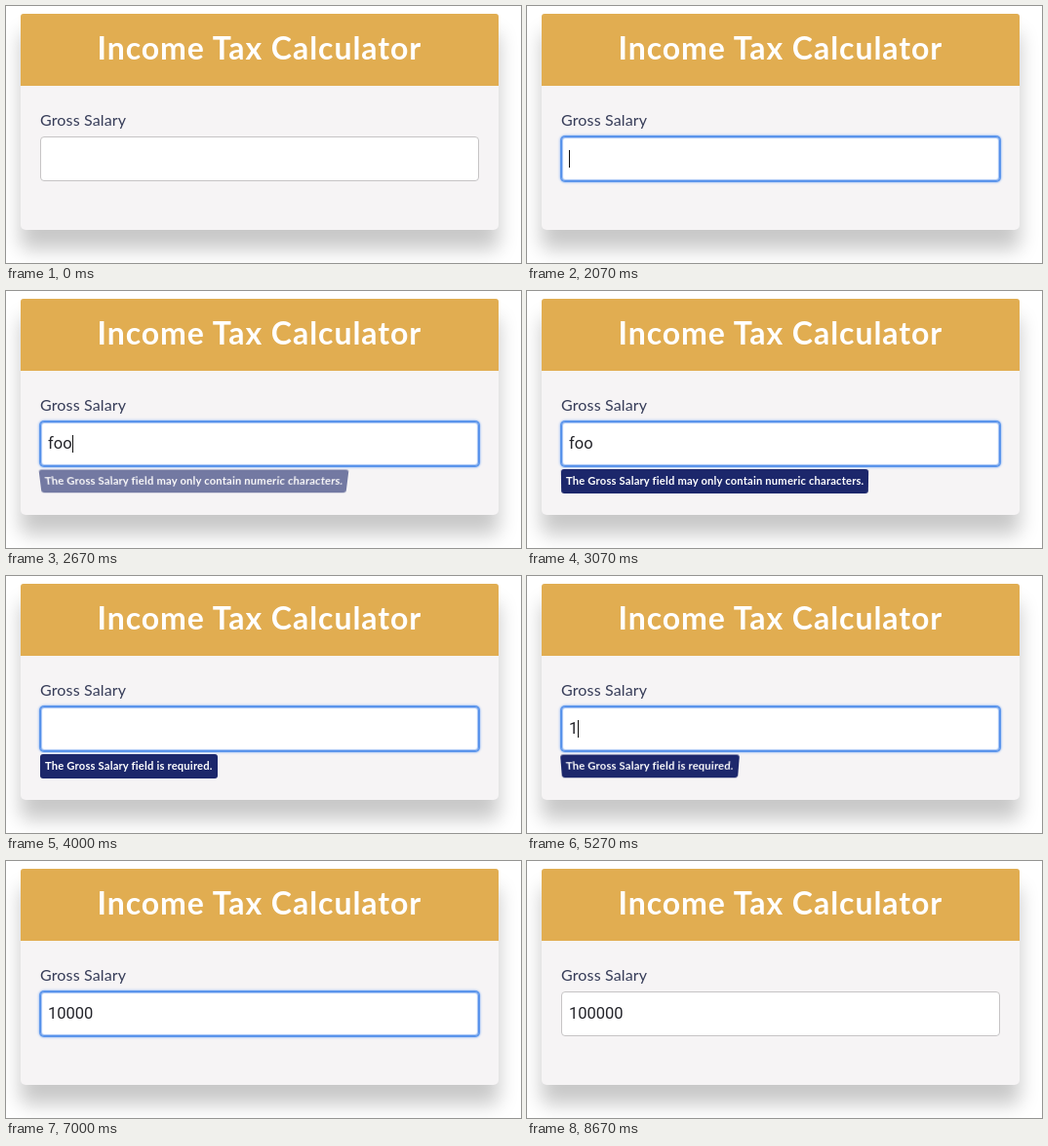
An HTML page that plays this animation: 528 px wide and 264 px high, repeating every 9940 ms.

```html
<!DOCTYPE html>
<html lang="en">
<head>
<meta charset="utf-8">
<title>Income Tax Calculator</title>
<style>
html, body { margin: 0; width: 100%; height: 100%; overflow: hidden; background: #fff; }
body { position: relative; font: 16px Lato, "Open Sans", sans-serif; white-space: pre; }
div { position: absolute; box-sizing: border-box; }
#card {
  left: 15px; top: 8px; width: 490px; height: 222px; border-radius: 4px 4px 5px 5px;
  background: #f6f4f5; box-shadow: 0 20px 20px rgba(0, 0, 0, .22);
}
#head {
  width: 490px; height: 74px; padding-left: 78.5px; border-radius: 3px 3px 0 0;
  background: #e1ad51; color: #fff; font-size: 32px; font-weight: 700;
  line-height: 70px; letter-spacing: .95px;
}
#label { left: 20px; top: 99px; line-height: 20px; letter-spacing: .15px; color: #363c58; }
#field {
  left: 20px; top: 126px; width: 450px; height: 46px; padding: 13px 7px;
  border: 1px solid #c6c4c5; border-radius: 4px; background: #fff;
  color: #25252b; font: 16.5px/18px Roboto, sans-serif;
}
#field.focus {
  border-color: #5590ea;
  box-shadow: 0 0 0 1px #5f98ec, 0 0 2px 1.5px #9dbff5, inset 0 0 1px 1px #a5c4f5;
}
#caret {
  display: inline-block; width: 1px; height: 18px; margin-right: -1px;
  vertical-align: top; background: #111;
}
#error {
  left: 20px; top: 175px; height: 25px; padding: 0 5px; border-radius: 3px;
  background: #1c276b; color: #fff; font-size: 11.2px; font-weight: 700;
  line-height: 24px; letter-spacing: .19px;
}
</style>
</head>
<body>
<div id="card"><div id="head">Income Tax Calculator</div><div id="label">Gross Salary</div><div id="field"><span id="value"></span><span id="caret"></span></div><div id="error"></div></div>
<script>
const LOOP = 9940;
const FOCUS = 1070, BLUR = 8670;
const FLIP_IN = 2250, REQUIRED = 3870, FLIP_OUT = 4990, GONE = 5930;

// [time, value]
const values = [
  [0, ''], [2270, 'f'], [2400, 'fo'], [2530, 'foo'],
  [3330, 'fo'], [3600, 'f'], [3800, ''],
  [5000, '1'], [5530, '10'], [5870, '100'], [6270, '1000'], [6530, '10000'], [7530, '100000']
];
// The caret toggles at each of these times
const blinks = [FOCUS, 1530, 2070, 3060, 3530, 4000, 4530, 7000, 7530, 8070, 8530, BLUR];

const [field, value, caret, error] =
  ['field', 'value', 'caret', 'error'].map(id => document.getElementById(id));

const tilt = deg => `perspective(400px) rotateX(${deg}deg)`;

function pausedFlip(frames, options) {
  const flip = error.animate(frames, options);
  flip.pause();
  return flip;
}

const flipIn = pausedFlip([
  { offset: 0, transform: tilt(90), opacity: 0, easing: 'ease-in' },
  { offset: .4, transform: tilt(-20), easing: 'ease-in' },
  { offset: .6, transform: tilt(10), opacity: 1, easing: 'ease' },
  { offset: .8, transform: tilt(-5), easing: 'ease' },
  { offset: 1, transform: tilt(0), opacity: 1 }
], { duration: 950, fill: 'both' });

const flipOut = pausedFlip([
  { offset: 0, transform: tilt(0), opacity: 1 },
  { offset: .3, transform: tilt(-20), opacity: 1 },
  { offset: 1, transform: tilt(90), opacity: 0 }
], { duration: 930, fill: 'forwards' });

function setText(el, text) {
  if (el.textContent !== text) el.textContent = text;
}

function draw(now) {
  const t = now % LOOP;
  field.classList.toggle('focus', t >= FOCUS && t < BLUR);
  setText(value, values.filter(([at]) => at <= t).pop()[1]);
  caret.style.visibility = blinks.filter(at => at <= t).length % 2 ? 'visible' : 'hidden';

  setText(error, 'The Gross Salary field ' +
    (t < REQUIRED ? 'may only contain numeric characters.' : 'is required.'));
  error.style.visibility = t >= FLIP_IN && t < GONE ? 'visible' : 'hidden';
  flipIn.currentTime = t - FLIP_IN;
  flipOut.currentTime = t - FLIP_OUT;
  requestAnimationFrame(() => draw(performance.now()));
}
draw(0);
</script>
</body>
</html>
```
